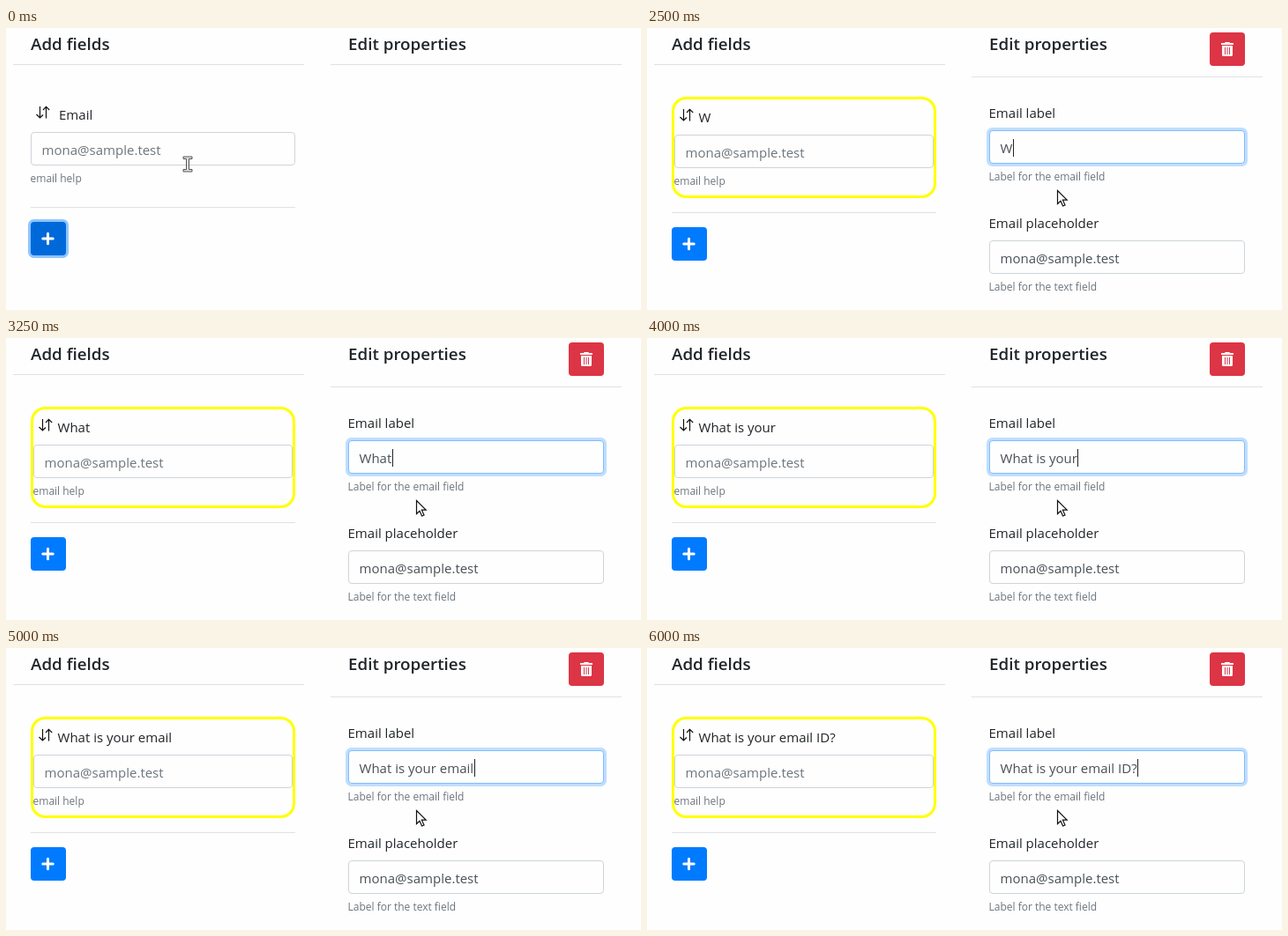
An HTML page for the animation above (6500 ms loop, 720 px wide and 320 px high).

```html
<!DOCTYPE html>
<html lang="en">
<head>
<meta charset="utf-8">
<title>Form builder</title>
<style>
  html, body { margin: 0; width: 100%; height: 100%; overflow: hidden; background: #fefefe; }
  svg { display: block; width: 100%; height: 100%; }
  text { font: 15px "Open Sans", "Noto Sans", sans-serif; fill: #212529; white-space: pre; }
  .head { font-size: 18.8px; font-weight: 600; }
  .help { font-size: 12px; fill: #6c757d; }
  .hint { fill: #6c757d; }
  .value { fill: #495057; }
  .option { font-size: 12px; font-weight: 600; fill: #222; }
</style>
</head>
<body>
<svg id="stage" viewBox="0 0 720 320"></svg>
<script>
const LOOP = 6500;
const HINT = 'mona@sample.test';
const OPTION = 'moon.dock@dome.test';
const PHRASE = 'What is your email ID?';
// [time, number of typed characters]
const KEYS = [[2500, 1], [2750, 2], [3000, 3], [3250, 4], [3500, 7], [4000, 12],
              [4500, 13], [5000, 18], [5500, 21], [6000, 22]];
const stage = document.getElementById('stage');

const text = (x, y, s, cls = '', id = '') =>
  `<text x="${x}" y="${y}" class="${cls}" id="${id}">${s}</text>`;

const rect = (x, y, w, h, r, attrs) =>
  `<rect x="${x}" y="${y}" width="${w}" height="${h}" rx="${r}" ${attrs}/>`;

const path = (d, attrs) => `<path d="${d}" ${attrs}/>`;

const rule = (x, y, w) => rect(x, y, w, 1, 0, 'fill="#dfe1e3"');

const at = (x, y, s) => `<g transform="translate(${x} ${y})">${s}</g>`;

function input(x, y, w, focus) {
  const ring = focus ? rect(x - 3, y - 3, w + 6, 44, 6.5, 'fill="#bfdeff"') : '';
  return ring + rect(x + .5, y + .5, w - 1, 37, 3.5,
    `fill="#fefefe" stroke="${focus ? '#80bdff' : '#ced4da'}"`);
}

const caret = (x, y) => rect(x, y, 1, 20, 0, 'fill="#222" id="caret"');

const sortIcon = (x, y) => at(x, y, path(
  'M4.5 0V13M.5 9L4.5 13L8 9.5M11.5 13.5V.5M8 4L11.5 .4L15.2 4',
  'fill="none" stroke="#111" stroke-width="1.2"'));

function addButton(y, focus) {
  const ring = focus ? rect(25, y - 3, 46, 44, 6.5, 'fill="#8ec5ff"') : '';
  return ring + rect(28, y, 40, 38, 4, `fill="${focus ? '#0069d9' : '#007bff'}"`) +
    path(`M41.8 ${y + 19}H53.2M47.5 ${y + 13.3}V${y + 24.7}`,
      'stroke="#fff" stroke-width="3" stroke-linecap="round"');
}

const trashButton = () => rect(638, 5, 40, 38, 4, 'fill="#dc3545"') + at(651, 16,
  path('M0 1.7Q0 1 .7 1H4L4.6 0H9.4L10 1H13.3Q14 1 14 1.7V3H0Z' +
       'M1 4H13V14.5Q13 16 11.5 16H2.5Q1 16 1 14.5Z', 'fill="#fff"') +
  path('M4.5 6.4V13.6M7 6.4V13.6M9.5 6.4V13.6',
    'stroke="#dc3545" stroke-linecap="round"'));

const beam = (x, y) => at(x, y, path(
  'M-5 -8.5H5V-6H1.5V6H5V8.5H-5V6H-1.5V-6H-5Z',
  'fill="#ddd" stroke="#333" stroke-width=".8"'));

const pointer = (x, y) => at(x, y, path(
  'M.5 .5V15.5L4 12.2L6.6 18L9 17L6.4 11.2H11.2Z',
  'fill="#fff" stroke="#111" stroke-width="1.2"'));

const heads = () => rect(0, 0, 720, 320, 0, 'fill="#fefefe"') +
  text(28, 24.5, 'Add fields', 'head') + text(388, 24.5, 'Edit properties', 'head') +
  rule(8, 41, 330);

// The form field with its icon, label, box and help line
const field = (x, y, w, label, labelX, focus) =>
  sortIcon(x + 6, y - 29) + text(labelX, y - 14.5, label) + input(x, y, w, focus) +
  text(x + 12.5, y + 26, HINT, 'hint') + text(x - .5, y + 57, 'email help', 'help');

const property = (y, label, help, focus) =>
  text(387.5, y - 14.5, label) + input(388, y, 290, focus) +
  text(387.5, y + 57, help, 'help');

function pickScene(focus) {
  const base = heads() + rule(368, 41, 330) + field(28, 118, 300, 'Email', 60, focus);
  if (!focus) return base + rule(28, 203, 300) + addButton(220, true) + beam(206, 154.5);
  const shade = [3, 2, 1].map(d =>
    rect(27 - d / 2, 158, 301 + d, 51 + d, 3, 'fill="#000" opacity=".06"')).join('');
  return base + caret(41, 128) + shade + rect(27, 157, 301, 52, 2, 'fill="#fefefe"') +
    text(39, 188, OPTION, 'option') + addButton(220, false) + beam(206, 145.5) +
    '<circle cx="205.5" cy="144.5" r="12" fill="#ff0" opacity=".65"/>';
}

const editScene = typed => heads() + rule(368, 55, 330) + trashButton() +
  rect(29.5, 79.5, 297, 112, 15, 'fill="none" stroke="#ff0" stroke-width="3"') +
  field(31, 121, 294, typed, 58.5, false) + rule(28, 209, 300) + addButton(226, false) +
  property(116, 'Email label', 'Label for the email field', true) +
  text(400.5, 142, typed, 'value', 'typed') + caret(0, 126) +
  property(241, 'Email placeholder', 'Label for the text field', false) +
  text(400.5, 267, HINT, 'value') + pointer(465, 184);

let shown;

function draw(t) {
  const count = KEYS.reduce((n, [time, k]) => t >= time ? k : n, 0);
  const state = count || (t < 2000 ? 'idle' : 'focus');
  if (state === shown) return;
  shown = state;
  stage.innerHTML = count ? editScene(PHRASE.slice(0, count)) : pickScene(state === 'focus');
  if (count) {
    const end = 400.5 + document.getElementById('typed').getComputedTextLength();
    document.getElementById('caret').setAttribute('x', Math.round(end + .5));
  }
}

function tick() {
  draw(performance.now() % LOOP);
  requestAnimationFrame(tick);
}
tick();
</script>
</body>
</html>
```
